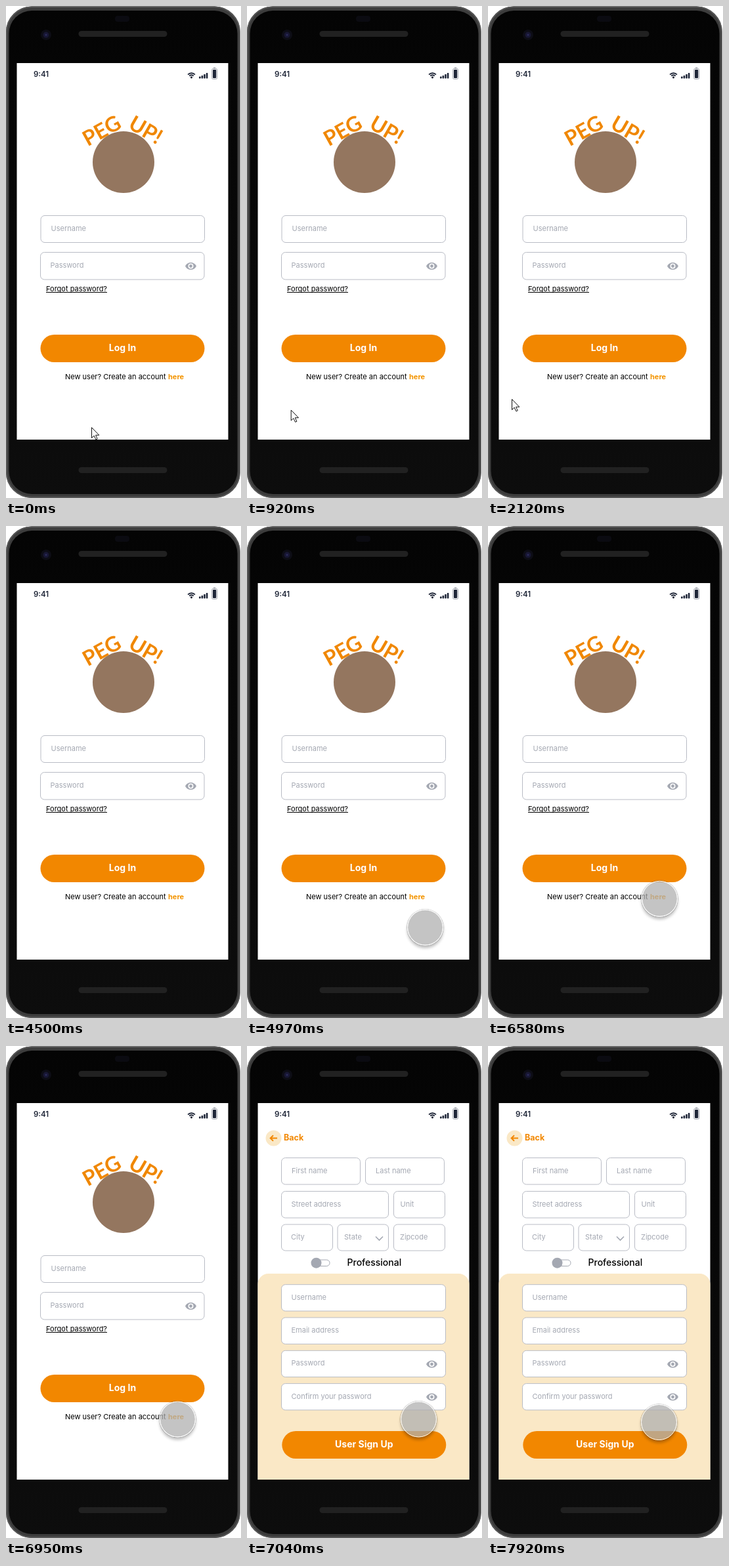
Write an HTML page that moves like this. It is 358 px wide and 750 px high and loops after 8000 ms.

```html
<!DOCTYPE html>
<html lang="en">
<head>
<meta charset="utf-8">
<title>Sign up flow</title>
<style>
  html, body { margin: 0; width: 100%; height: 100%; overflow: hidden; background: #fff; }
  svg { position: absolute; left: 0; top: 0; display: block; }
  text { font-family: Inter, sans-serif; white-space: pre; }
  .logo text { font: 700 32px Lato, sans-serif; fill: #f08700; }
  #touch {
    position: absolute; left: 0; top: 0; width: 55px; height: 55px;
    box-sizing: border-box; border: 1.5px solid #fff; border-radius: 50%;
    background: rgba(176, 176, 176, .74) padding-box;
    box-shadow: 0 0 1px 0.5px rgba(0, 0, 0, .35), 0 4px 4px rgba(0, 0, 0, .25);
  }
</style>
</head>
<body>
<svg id="stage" width="358" height="750" viewBox="0 0 358 750"></svg>
<div id="touch"></div>
<script>
const ORANGE = '#f28700', LINK = '#f39400', GREY = '#a4a8b2', INK = '#1f2638', CREAM = '#fae8c6';

const rect = (x, y, w, h, r, fill, extra = '') =>
  `<rect x="${x}" y="${y}" width="${w}" height="${h}" rx="${r}" fill="${fill}" ${extra}/>`;

const circle = (x, y, r, fill, extra = '') =>
  `<circle cx="${x}" cy="${y}" r="${r}" fill="${fill}" ${extra}/>`;

// cy is the middle of the capital letters; baselines sit on whole pixels
const label = (x, cy, s, size = 11, weight = 400, fill = '#000', extra = '') =>
  `<text x="${x}" y="${Math.floor(cy + size * 0.364 - 0.5)}" font-size="${size}" font-weight="${weight}" fill="${fill}" ${extra}>${s}</text>`;

const field = (x, y, w, h, s, tx) =>
  rect(x, y, w, h, 6, '#fff', 'stroke="#b9bcc5"') + label(tx, y + h / 2, s, 11, 400, GREY);

const eye = y => `<g transform="translate(281.5 ${y})">
  <path d="M-8.5 0C-5 -7.4 5 -7.4 8.5 0C5 7.4 -5 7.4 -8.5 0Z" fill="${GREY}"/>
  ${circle(0, 0, 3.2, GREY, 'stroke="#fff" stroke-width="1.6"')}</g>`;

const button = (x, y, s) => rect(x, y, 250, 42, 21, ORANGE) +
  label(x + 125, y + 21, s, 14, 700, '#fff', 'text-anchor="middle"');

const phone = `
  <defs><linearGradient id="face" x2="0" y2="1">
    <stop offset="0" stop-color="#040404"/><stop offset="1" stop-color="#0d0d0d"/>
  </linearGradient></defs>
  ${rect(0, 0.5, 356.8, 749.5, 39, '#3c3c3c')}
  ${rect(1, 1.5, 354.8, 747.5, 38, 'none', 'stroke="#565656" stroke-width="2"')}
  ${rect(4.5, 7, 348, 737, 35, 'url(#face)')}
  ${rect(166, 15, 22, 9, 4, '#0b0b11')}
  ${rect(110.5, 38, 135, 9, 4.5, '#212121')}
  ${rect(110.5, 703, 135, 9, 4.5, '#212121')}
  ${circle(61, 44, 8, '#0d0d15')}${circle(61, 44, 4.5, '#181734')}${circle(61, 44, 1.5, '#2d2c5c')}
  ${rect(16.5, 87, 322, 574, 0, '#fff')}`;

const wifiArc = r => {
  const d = r * 0.72;
  return `<path d="M${282.5 - d} ${110 - d}A${r} ${r} 0 0 1 ${282.5 + d} ${110 - d}" fill="none" stroke="${INK}" stroke-width="1.9"/>`;
};

const statusBar = label(42, 105, '9:41', 11.5, 600, INK) +
  wifiArc(7.5) + wifiArc(4.6) + circle(282.5, 108.8, 1.6, INK) +
  [3, 4.5, 6.5, 8.5].map((h, i) => rect(294 + i * 3.6, 110.5 - h, 2.6, h, 0.7, INK)).join('') +
  rect(313.6, 95.5, 8, 16, 2, '#fff', 'stroke="#9a9ea8" stroke-width=".9"') +
  rect(315, 97, 5.2, 13, 1, INK) + rect(315.8, 93.4, 3.6, 1.4, 0.6, '#9a9ea8');

const login = `<g id="login">
  <g class="logo">
    ${circle(179, 238, 47, '#94765f')}
    <text transform="translate(124.5 214.5) rotate(-29)">PEG</text>
    <text transform="translate(184.5 185.5) rotate(30)">UP!</text>
  </g>
  ${field(53, 319.5, 249.5, 41, 'Username', 68.5)}
  ${field(52.5, 375.5, 249.5, 41.5, 'Password', 67.5)}
  ${eye(396.5)}
  ${label(61, 431.5, 'Forgot password?')}
  ${rect(61, 436, 93, 1, 0, '#000')}
  ${button(52.5, 501, 'Log In')}
  ${label(90, 565.5, 'New user? Create an account')}
  ${label(247, 565.5, 'here', 11, 700, LINK)}
</g>`;

const signup = `<g id="signup">
  ${circle(40.5, 140.5, 12, CREAM)}
  <path d="M46 140.5H36M40 136.2L35.6 140.5L40 144.8" fill="none" stroke="${ORANGE}" stroke-width="1.9"/>
  ${label(56, 140.5, 'Back', 12.5, 700, ORANGE)}
  ${field(52.5, 170.5, 120, 40.5, 'First name', 68)}
  ${field(180.5, 170.5, 120, 40.5, 'Last name', 196)}
  ${field(52.5, 221.5, 163, 40.5, 'Street address', 67.5)}
  ${field(223.5, 221.5, 78, 40.5, 'Unit', 233.5)}
  ${field(52.5, 272, 78, 40, 'City', 67)}
  ${field(138, 272, 77.5, 40, 'State', 148)}
  ${field(223.5, 272, 78, 40, 'Zipcode', 233)}
  <path d="M196 290.5L201.5 296L207 290.5" fill="none" stroke="${GREY}" stroke-width="1.6"/>
  ${rect(100, 326, 26, 9.5, 4.75, '#fff', `stroke="${GREY}"`)}
  ${circle(105.5, 330.7, 8, GREY)}
  ${label(152.5, 331, 'Professional', 14, 500)}
  <path d="M16.5 661V363a16 16 0 0 1 16 -16H322.5a16 16 0 0 1 16 16V661Z" fill="${CREAM}"/>
  ${['Username', 'Email address', 'Password', 'Confirm your password']
    .map((s, i) => field(52.5, 363.7 + i * 50.3, 250, 40.3, s, 67.5)).join('')}
  ${eye(485)}${eye(535)}
  ${button(53.3, 587, 'User Sign Up')}
</g>`;

const pointer = `<path id="cursor" d="M.5 .5V16.5L4.1 13L6.9 18.8L9.2 17.8L6.6 12.2H11.8Z"
  fill="#fff" stroke="#111" stroke-width="1"/>`;

const $ = id => document.getElementById(id);
$('stage').innerHTML = phone + statusBar + login + signup + pointer;

const LOOP = 8000, CUT = 7040;
const smooth = p => p * p * (3 - 2 * p);

// Each move: first step time, last step time, number of steps, end x, end y
function track(x, y, moves) {
  const keys = [[0, x, y]];
  for (const [t0, t1, n, x1, y1] of moves) {
    for (let k = 0; k < n; k++) {
      const p = smooth((k + 1) / n);
      keys.push([t0 + (n > 1 ? (t1 - t0) * k / (n - 1) : 0), x + (x1 - x) * p, y + (y1 - y) * p]);
    }
    [x, y] = [x1, y1];
  }
  return t => keys.findLast(k => k[0] <= t);
}

const cursorAt = track(130, 642, [
  [100, 830, 9, 70, 616],
  [920, 1290, 5, 38, 611],
  [1530, 1530, 1, 37, 611],
  [2030, 2120, 2, 36, 599],
  [3460, 3460, 1, 41, 595],
]);

const touchAt = track(294, 711, [
  [4670, 4880, 3, 273, 621],
  [4970, 4970, 1, 271.5, 612],
  [5050, 5550, 6, 261.5, 567.5],
  [6040, 6040, 1, 261.5, 568],
  [6500, 6670, 3, 261.5, 569],
  [7920, 7920, 1, 260.5, 573.5],
]);

const show = (id, on) => { $(id).style.visibility = on ? 'visible' : 'hidden'; };

function draw() {
  const t = performance.now() % LOOP;
  const [, cx, cy] = cursorAt(t), [, tx, ty] = touchAt(t);
  $('cursor').setAttribute('transform', `translate(${cx} ${cy})`);
  $('touch').style.transform = `translate(${tx - 27.5}px, ${ty - 27.5}px)`;
  show('cursor', t < 3540);
  show('touch', t >= 4580);
  show('login', t < CUT);
  show('signup', t >= CUT);
  requestAnimationFrame(draw);
}
draw();
</script>
</body>
</html>
```
